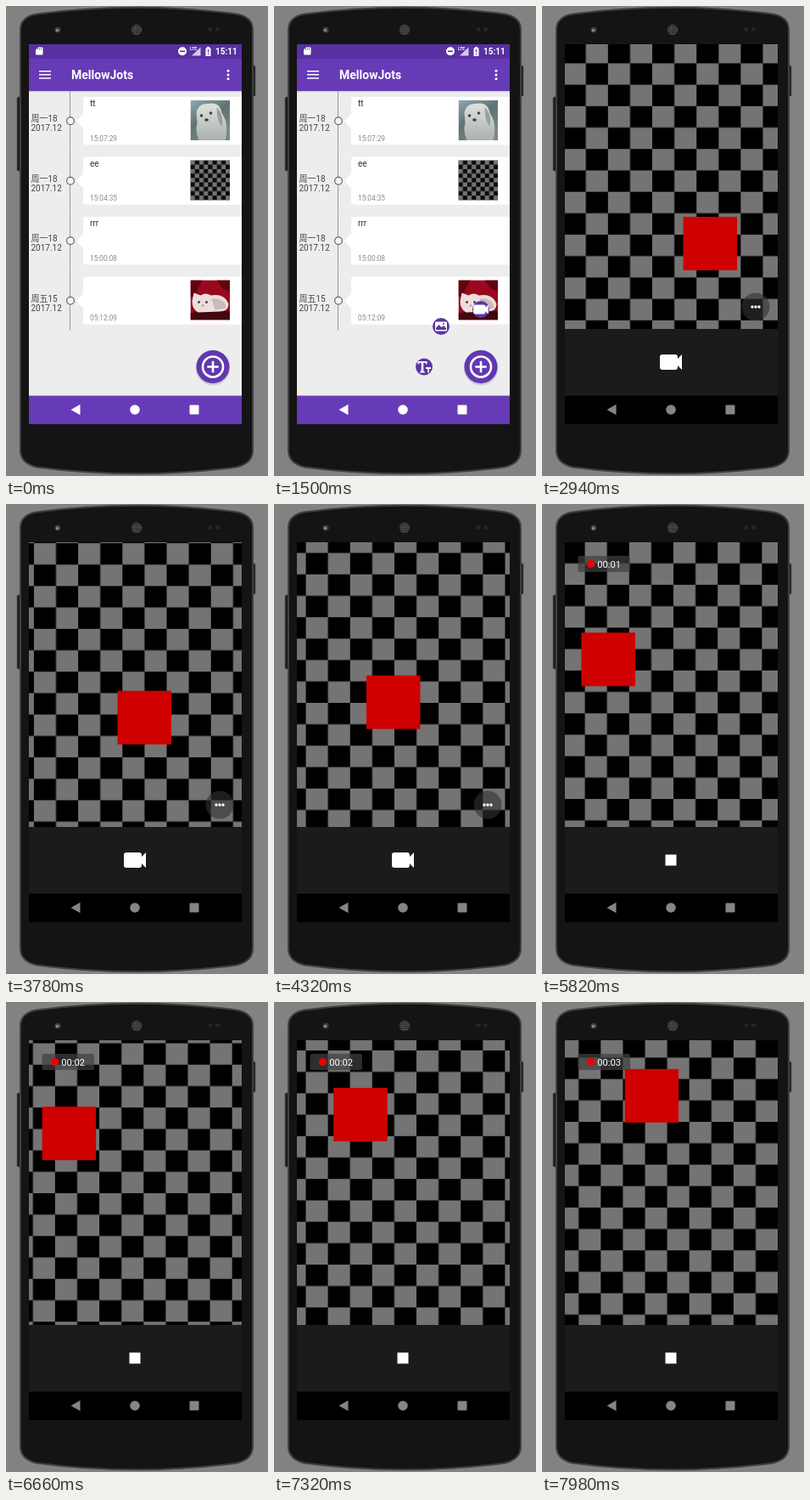
Recreate the animation shown at these times as an HTML page. Size 309x553 px, loop 8000 ms.

```html
<!DOCTYPE html>
<html lang="en">
<head>
<meta charset="utf-8">
<title>Notes app recording</title>
<style>
  html, body { margin: 0; width: 100%; height: 100%; overflow: hidden; background: #828282; }
  svg { display: block; width: 100%; height: 100%; font-family: Roboto, "Noto Sans CJK SC", "Noto Sans CJK", sans-serif; }
  .date { font-size: 10px; fill: #444; }
  .note { font-size: 10px; fill: #333; }
  .time { font-size: 8.3px; fill: #888; }
</style>
</head>
<body>
<svg viewBox="0 0 309 553">
  <defs>
    <pattern id="checker" width="52.2" height="50.4" patternUnits="userSpaceOnUse">
      <rect width="52.2" height="50.4"/>
      <path d="M0 0h26.1v25.2H0zM26.1 25.2h26.1v25.2H26.1z" fill="#747474"/>
    </pattern>
    <pattern id="thumbChecker" width="10.4" height="10.4" patternUnits="userSpaceOnUse">
      <rect width="10.4" height="10.4" fill="#0a0a0a"/>
      <path d="M0 0h5.2v5.2H0zM5.2 5.2h5.2v5.2H5.2z" fill="#747474"/>
    </pattern>
    <pattern id="grille" width="2.4" height="2.4" patternUnits="userSpaceOnUse">
      <circle cx="1.2" cy="1.2" r=".75" fill="#666"/>
    </pattern>
    <linearGradient id="wall" x2=".6" y2="1">
      <stop stop-color="#8fa9b0"/><stop offset=".5" stop-color="#5f7274"/><stop offset="1" stop-color="#7c8a80"/>
    </linearGradient>
    <linearGradient id="fur" x2="0" y2="1">
      <stop stop-color="#dfe2dd"/><stop offset="1" stop-color="#a9b2ad"/>
    </linearGradient>
    <clipPath id="screen"><rect x="27" y="45" width="251" height="447"/></clipPath>
    <clipPath id="preview"><rect x="27" y="45" width="251" height="335"/></clipPath>
    <clipPath id="thumb"><rect width="46.5" height="47"/></clipPath>
    <path id="video" d="M-12-9H5q3 0 3 3v2l5-5V9L8 4v2q0 3-3 3H-10q-3 0-3-3V-6q0-3 3-3z"/>
    <g id="nav">
      <path d="M76.5 475l11-6.2v12.4z"/><circle cx="152" cy="475" r="5.8"/>
      <rect x="216.5" y="469.5" width="11" height="11" rx="1"/>
    </g>
    <g id="dogPhoto" clip-path="url(#thumb)">
      <rect width="47" height="47" fill="url(#wall)"/>
      <path d="M10 47Q5 36 8 27L7 14Q10 3 20 4Q35 1 37 15Q46 27 41 47z" fill="url(#fur)"/>
      <path d="M31 8Q40 17 37 31Q31 25 31 8z" fill="#98a29d"/>
      <g fill="#3c4144"><circle cx="13" cy="18" r="1.8"/><circle cx="24" cy="15" r="1.8"/><ellipse cx="19" cy="23" rx="2.4" ry="1.7"/></g>
    </g>
    <g id="kittenPhoto" clip-path="url(#thumb)">
      <rect width="47" height="47" fill="#99091b"/>
      <path d="M0 0h14L5 18 0 20zM31 0h16v14L37 9z" fill="#5f0612"/>
      <path d="M0 39Q24 33 47 37V47H0z" fill="#43070e"/>
      <path d="M2 25L4 15 12 18Q18 14 24 18Q40 15 45 28Q45 37 34 37L9 38Q2 34 2 25z" fill="#eadfdd"/>
      <path d="M25 22Q40 20 42 33L29 35z" fill="#cdb9b8"/>
      <g fill="#54383b"><circle cx="10" cy="26" r="1.4"/><circle cx="19" cy="26" r="1.4"/></g>
      <circle cx="14.5" cy="30" r="1.2" fill="#cf8a8c"/>
    </g>
    <rect id="checkPhoto" width="46.5" height="47" fill="url(#thumbChecker)"/>
  </defs>

  <rect width="309" height="553" fill="#828282"/>
  <g fill="#202020" stroke="#4a4a4a" stroke-width=".6">
    <rect x="13" y="107" width="5" height="87" rx="1.5"/>
    <rect x="290" y="70" width="4" height="36" rx="1.5"/>
  </g>
  <path d="M17 28Q17 13 36 9.5Q154-6 272 9.5Q291 13 291 28V523Q291 538 272 542.5Q154 558 36 542.5Q17 538 17 523z" fill="#141414" stroke="#3f3f3f" stroke-width="2"/>
  <circle cx="61" cy="28" r="3.6" fill="#3a3a46"/><circle cx="60.5" cy="28.5" r="1.8" fill="#8588a5"/>
  <circle cx="154" cy="28" r="6.5" fill="#2a2a2a"/><circle cx="154" cy="28" r="6" fill="url(#grille)"/>
  <g fill="#252525"><circle cx="241" cy="27.5" r="2.5"/><circle cx="249.5" cy="27.5" r="2.5"/></g>

  <g clip-path="url(#screen)">
    <rect x="27" y="45" width="251" height="447" fill="#ededee"/>
    <rect x="27" y="45" width="251" height="17" fill="#5730a2"/>
    <rect x="27" y="62" width="251" height="38" fill="#673ab7"/>
    <rect x="27" y="100" width="251" height="1.5" opacity=".1"/>
    <g fill="#fff">
      <path d="M38 48.5h4.500q1 0 1 1v7q0 1-1 1H36q-1 0-1-1V51.5z"/>
      <circle cx="208" cy="53.3" r="5"/>
      <path d="M219 58.5L229.5 48.5v10z" opacity=".75"/>
      <text x="217" y="52" font-size="5" font-weight="700">LTE</text>
      <path d="M235.5 49.5H237V48h3v1.5h1.5V59h-6z"/>
      <text x="247" y="57" font-size="10" font-weight="700">15:11</text>
      <path d="M39 76h14v1.5H39zM39 80.1h14v1.5H39zM39 84.2h14v1.5H39z"/>
      <text x="77" y="86.3" font-size="14" font-weight="700">MellowJots</text>
      <circle cx="262" cy="76.3" r="1.5"/><circle cx="262" cy="81" r="1.5"/><circle cx="262" cy="85.7" r="1.5"/>
    </g>
    <path d="M37.500 49.500v2M39.500 49.500v2M41.500 49.500v2" stroke="#5730a2" stroke-width=".8"/>
    <path d="M205 53.3h6" stroke="#5730a2" stroke-width="1.6"/>
    <path d="M238.5 51v3.5M238.5 55.8v1.5" stroke="#5730a2" stroke-width="1.3"/>
    <g id="rows"></g>
    <circle cx="244" cy="426" r="20.3" opacity=".14"/>
    <circle cx="244" cy="424.5" r="19.5" fill="#6138b0"/>
    <g fill="none" stroke="#fff" stroke-width="2.6">
      <circle cx="244" cy="424.5" r="12"/><path d="M237.3 424.5h13.4M244 417.8v13.4"/>
    </g>
    <g id="menu">
      <g>
        <circle r="10" fill="#5c36a8"/>
        <path d="M-7.500-6.500H3.500V-3H2.500L1.500-4.700H-.700V5l1.700 1V7h-6V6l1.700-1V-4.700H-5.500L-6.500-3h-1z" fill="#fff"/>
        <path d="M2 .500h6V2.500H5.800V7H4.200V2.500H2z" fill="#fff"/>
      </g>
      <g>
        <circle r="10" fill="#5c36a8"/>
        <rect x="-7" y="-5.5" width="14" height="11" rx="1" fill="#fff"/>
        <path d="M-6 4V1.500L-2.500-2 .5 1 3-1 6 2V4z" fill="#5c36a8"/><circle cx="3" cy="-3" r="1" fill="#5c36a8"/>
      </g>
      <g><circle r="10" fill="#5c36a8"/><use href="#video" fill="#fff" transform="scale(.68 .6)"/></g>
    </g>
    <rect x="27" y="458.5" width="251" height="34" fill="#673ab7"/>
    <use href="#nav" fill="#fff"/>

    <g id="camera">
      <rect x="27" y="45" width="251" height="447"/>
      <g id="feed" clip-path="url(#preview)">
        <rect x="27" y="45" width="251" height="335" fill="url(#checker)"/>
        <rect id="square" width="63.5" height="63" fill="#cf0000"/>
      </g>
      <rect x="27" y="380" width="251" height="78.5" fill="#1b1b1b"/>
      <use href="#nav" fill="#858585"/>
      <g id="idle">
        <circle cx="252" cy="354" r="16.5" fill="#333" opacity=".6"/>
        <g fill="#fff"><circle cx="248" cy="354" r="1.7"/><circle cx="252" cy="354" r="1.7"/><circle cx="256" cy="354" r="1.7"/></g>
        <use href="#video" x="152" y="419" fill="#fff"/>
      </g>
      <g id="recording">
        <rect x="42.5" y="61" width="61.5" height="19" rx="2" fill="#404040" opacity=".7"/>
        <circle cx="57.5" cy="70.5" r="4.6" fill="#f00000"/>
        <text id="clock" x="65.3" y="74.8" font-size="11.2" fill="#fff"></text>
        <rect x="145.5" y="412.5" width="13" height="13" fill="#fff"/>
      </g>
    </g>
  </g>
</svg>
<script>
const $ = id => document.getElementById(id);
const LOOP = 8000, STEP = 60;
const MENU_START = 960, CAMERA_START = 2400, FEED_START = 2640, RECORD_START = 4400;
const HUB = [244, 424.5];
const menuEnds = [[177, 424.5], [197, 377], [244, 357]];
const clamp = v => Math.min(1, Math.max(0, v));

const notes = [
  ['周一18', 'tt', '15:07:29', 'dogPhoto'],
  ['周一18', 'ee', '15:04:35', 'checkPhoto'],
  ['周一18', 'rrr', '15:00:08', ''],
  ['周五15', '', '05:12:09', 'kittenPhoto']
];
$('rows').innerHTML = notes.map(([day, title, time, photo], i) => `
  <g transform="translate(0 ${100 + i * 70.5})">
    <path d="M75.5 0V30.5M75.5 40V70" stroke="#999"/>
    <circle cx="76" cy="35.3" r="4.4" fill="#f4f2f5" stroke="#666" stroke-width="1.2"/>
    <path d="M83 35.5L91 27V10q0-3 3-3H278V63.3H94q-3 0-3-3V44z" fill="#fff"/>
    <text class="date" x="29.5" y="36">${day}</text>
    <text class="date" x="29.5" y="47">2017.12</text>
    <text class="note" x="99" y="18">${title}</text>
    <text class="time" x="99" y="58.5">${time}</text>
    ${photo && `<use href="#${photo}" transform="translate(217.5 11)"/>`}
  </g>`).join('');

function overshoot(p, tension = 0.9) {
  const q = p - 1;
  return q * q * ((tension + 1) * q + tension) + 1;
}

function drawMenu(t) {
  [...$('menu').children].forEach((item, i) => {
    const p = clamp((t - MENU_START - i * 20) / 500);
    const k = overshoot(p);
    const [x, y] = HUB.map((h, axis) => h + (menuEnds[i][axis] - h) * k);
    item.setAttribute('transform', `translate(${x} ${y}) rotate(${720 * k}) scale(${Math.max(0, k)})`);
    item.setAttribute('opacity', clamp(k));
  });
}

function drawCamera(t) {
  const enter = clamp((t - CAMERA_START) / 240);
  $('camera').setAttribute('opacity', enter);
  $('camera').setAttribute('transform', `translate(0 ${36 * (1 - enter) ** 2})`);
  $('feed').setAttribute('visibility', t >= FEED_START ? 'visible' : 'hidden');

  const d = t - 3780;
  $('checker').setAttribute('patternTransform',
    `translate(${32.9 + d * 0.00867} ${46.1 - d * 0.0254})`);
  // The square drifts upwards and bounces off the left edge.
  $('square').setAttribute('x', 27 + Math.abs(139.5 - (t - 2940) * 0.0417));
  $('square').setAttribute('y', 248 - (t - 2940) / 29.8);

  const recording = t >= RECORD_START;
  $('idle').setAttribute('display', recording ? 'none' : 'inline');
  $('recording').setAttribute('display', recording ? 'inline' : 'none');
  const seconds = Math.max(0, Math.floor((t - RECORD_START) / 1000));
  $('clock').textContent = '00:' + String(seconds).padStart(2, '0');
}

function draw(now) {
  const t = Math.floor((now % LOOP) / STEP) * STEP;
  drawMenu(t);
  drawCamera(t);
  requestAnimationFrame(() => draw(performance.now()));
}
draw(performance.now());
</script>
</body>
</html>
```
